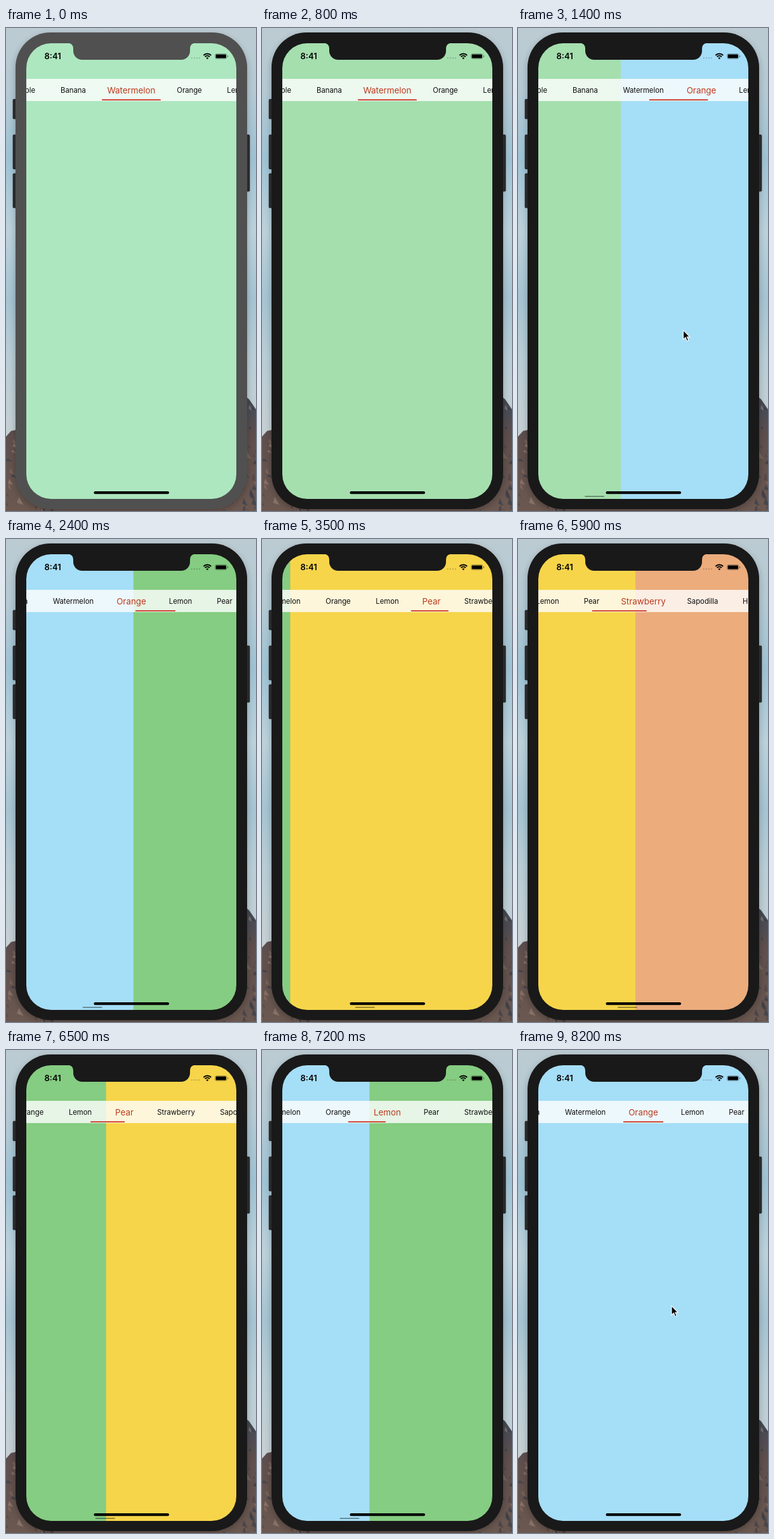
An HTML page for the animation above (8300 ms loop, 394 by 760 pixels).

```html
<!DOCTYPE html>
<html lang="en">
<head>
<meta charset="utf-8">
<title>Fruit tabs</title>
<style>
  html, body { margin: 0; width: 100%; height: 100%; overflow: hidden; background: #b9cdd6; }
  svg { display: block; width: 394px; height: 760px; }
  text { font-family: Inter, Roboto, sans-serif; }
  .tab { font-size: 11.3px; fill: #0c0c0c; text-anchor: middle; }
  .tab.on { font-size: 13.4px; fill: #bd3a1d; }
  .clock { font-size: 13px; font-weight: 600; }
</style>
</head>
<body>
<svg viewBox="0 0 394 760" xmlns="http://www.w3.org/2000/svg">
  <defs>
    <linearGradient id="sky" x2="0" y2="1">
      <stop offset="0" stop-color="#bccbd2"/>
      <stop offset=".13" stop-color="#b5cad4"/>
      <stop offset=".27" stop-color="#9fc2d3"/>
      <stop offset=".42" stop-color="#bcd2dc"/>
      <stop offset=".56" stop-color="#a6c4d2"/>
      <stop offset=".68" stop-color="#b9ced7"/>
      <stop offset=".84" stop-color="#c6d0d4"/>
    </linearGradient>
    <linearGradient id="rock" x2="0" y2="1">
      <stop offset="0" stop-color="#3d4a5a"/>
      <stop offset=".35" stop-color="#5e4f4e"/>
      <stop offset="1" stop-color="#6b5850"/>
    </linearGradient>
    <filter id="blur" x="-20%" y="-20%" width="140%" height="140%"><feGaussianBlur stdDeviation="6"/></filter>
    <clipPath id="screen"><rect x="32" y="24" width="331" height="717" rx="39"/></clipPath>
    <clipPath id="ridge"><path id="hills" d="M0 643L8 634L18 632L60 690L200 752L320 700L372 576L383 584L394 600V760H0Z"/></clipPath>
  </defs>

  <rect width="394" height="760" fill="url(#sky)"/>
  <use href="#hills" fill="url(#rock)"/>
  <g id="facets" clip-path="url(#ridge)"/>
  <rect x="16" y="12" width="363" height="747" rx="54" opacity=".3" filter="url(#blur)"/>

  <g fill="#2b2b2c" stroke="#141414" stroke-width=".6">
    <rect x="11" y="112" width="7" height="31" rx="1.5"/>
    <rect x="11" y="168" width="7" height="54" rx="1.5"/>
    <rect x="11" y="229" width="7" height="54" rx="1.5"/>
    <rect x="377" y="168" width="7" height="89" rx="1.5"/>
  </g>
  <rect class="body" x="15" y="7" width="365" height="750" rx="55"/>

  <g clip-path="url(#screen)">
    <g id="pages"/>
    <rect x="32" y="80" width="331" height="35" fill="#fff" fill-opacity=".8"/>
    <g id="strip"><rect id="line" y="112.2" height="1.7" fill="#cd2c1b"/></g>
    <rect id="scroller" y="736" width="31" height="2" rx="1" fill="#000"/>
  </g>

  <path class="body" d="M97 23.5q9 .5 9 9V36a14 14 0 0 0 14 14H276a14 14 0 0 0 14-14V32.500q0-8.500 9-9Z"/>
  <text class="clock" x="60.500" y="49">8:41</text>
  <g opacity=".25">
    <circle cx="292.800" cy="47.300" r="1"/><circle cx="296.800" cy="47.300" r="1"/>
    <circle cx="300.800" cy="47.300" r="1"/><circle cx="304.800" cy="47.300" r="1"/>
  </g>
  <g fill="none" stroke="#000" stroke-width="1.900">
    <path d="M311.300 43a8.500 8.500 0 0 1 12 0M313.600 45.300a5.300 5.300 0 0 1 7.400 0"/>
  </g>
  <path d="M317.300 49.300l-2-2.200a2.900 2.900 0 0 1 4 0Z"/>
  <rect x="329.500" y="40.500" width="18.500" height="8" rx="2.300" fill="none" stroke="#000" stroke-opacity=".35" stroke-width=".8"/>
  <rect x="330.600" y="41.500" width="16.300" height="6" rx="1.300"/>
  <path d="M349 43v3q1.300-.4 1.300-1.500t-1.300-1.500Z" opacity=".45"/>
  <rect x="138.500" y="729" width="118.500" height="4.300" rx="2.100"/>
  <path id="cursor" d="M0 0V14.500L3.400 11.400L5.900 17L8.300 16L5.800 10.500H10.300Z" stroke="#fff" stroke-width="1.100"/>
</svg>

<script>
const LOOP = 8300, STEP = 100, SWIPE = 600, RECENTRE = 200;
const CENTRE = 197.5, LEFT = 32, WIDTH = 331;

// name, centre in the strip, underline width, page colour
const tabs = [
  ["Apple", -167, 56],
  ["Banana", -91.5, 63],
  ["Watermelon", 0, 92.5, "#a5dfae"],
  ["Orange", 91.5, 63, "#a5def7"],
  ["Lemon", 169, 59, "#85cd82"],
  ["Pear", 238.5, 49, "#f6d54a"],
  ["Strawberry", 320, 86, "#ecac7c"],
  ["Sapodilla", 413.5, 72],
  ["Honeydew", 505, 80]
];
// start time, page reached
const swipes = [[1199, 3], [2238, 4], [3035, 5], [4000, 6], [5746, 5], [6370, 4], [7060, 3]];
// from, to, x, y
const pointers = [[1250, 1900, 260.5, 475.5], [7900, LOOP, 242, 402.5]];

const $ = id => document.getElementById(id);
const clamp = v => Math.max(0, Math.min(1, v));
const mix = (a, b, k) => a + (b - a) * k;
const smooth = k => k * k * (3 - 2 * k);
const spring = x => 1 - (1 + x) * Math.exp(-x);
const flick = k => spring(6 * clamp(k)) / spring(6);

function add(parent, name, attrs) {
  const el = document.createElementNS("http://www.w3.org/2000/svg", name);
  for (const key in attrs) el.setAttribute(key, attrs[key]);
  return parent.appendChild(el);
}

const labels = tabs.map(([name, x]) => {
  const el = add($("strip"), "text", { class: "tab", x });
  el.textContent = name;
  return el;
});
const pages = tabs.map(t => t[3] &&
  add($("pages"), "rect", { y: 24, width: WIDTH + 0.5, height: 717, fill: t[3] }));
const bodies = document.querySelectorAll(".body");

function drawRocks() {
  let seed = 7;
  const rnd = () => (seed = seed * 16807 % 2147483647) / 2147483647;
  const tones = ["#8a7264", "#3a3a44", "#a08a7c", "#4b4045", "#2f3a48"];
  for (let i = 0; i < 170; i++) {
    const x = i % 2 ? 320 + rnd() * 76 : rnd() * 80;
    const y = 575 + rnd() * 185;
    const w = 2 + rnd() * 6, h = 5 + rnd() * 11;
    add($("facets"), "path", {
      d: `M${x} ${y}l${w} ${h}l${-w * 1.4} ${-h * 0.3}Z`,
      fill: tones[Math.floor(rnd() * tones.length)],
      opacity: 0.55
    });
  }
}

function draw(t) {
  let pos = 2, scroll = tabs[2][1], width = tabs[2][2], glow = 0;
  for (const [start, page] of swipes) {
    const age = t - start;
    if (age < 0) break;
    const settle = smooth(clamp((age - SWIPE) / RECENTRE));
    pos = mix(pos, page, flick(age / SWIPE));
    scroll = mix(scroll, tabs[page][1], settle);
    width = mix(width, tabs[page][2], settle);
    glow = clamp(1 - (age - SWIPE - 250) / 250);
  }

  const base = Math.floor(pos), next = Math.min(base + 1, tabs.length - 1);
  const mid = mix(tabs[base][1], tabs[next][1], pos - base);
  $("strip").setAttribute("transform", `translate(${CENTRE - scroll})`);
  $("line").setAttribute("x", mid - width / 2);
  $("line").setAttribute("width", width);

  const active = Math.round(pos);
  labels.forEach((el, i) => {
    el.classList.toggle("on", i === active);
    el.setAttribute("y", i === active ? 103.1 : 102.4);
  });
  pages.forEach((el, i) => el && el.setAttribute("x", LEFT + (i - pos) * WIDTH));

  $("scroller").setAttribute("x", 58.8 + 17.74 * pos);
  $("scroller").setAttribute("opacity", 0.36 * glow);

  // the picture opens slightly pale
  const pale = clamp(1 - t / 300);
  const shade = Math.round(mix(25, 80, pale));
  bodies.forEach(el => el.setAttribute("fill", `rgb(${shade},${shade},${shade})`));
  pages[2].setAttribute("fill", `rgb(${mix(165, 173, pale)},${mix(223, 231, pale)},${mix(174, 191, pale)})`);

  const spot = pointers.find(([from, to]) => t >= from && t < to);
  $("cursor").setAttribute("visibility", spot ? "visible" : "hidden");
  if (spot) $("cursor").setAttribute("transform", `translate(${spot[2]} ${spot[3]})`);
}

drawRocks();
draw(0);
const origin = performance.now();
(function tick() {
  const t = (performance.now() - origin) % LOOP;
  draw(Math.floor(t / STEP) * STEP);
  requestAnimationFrame(tick);
})();
</script>
</body>
</html>
```
